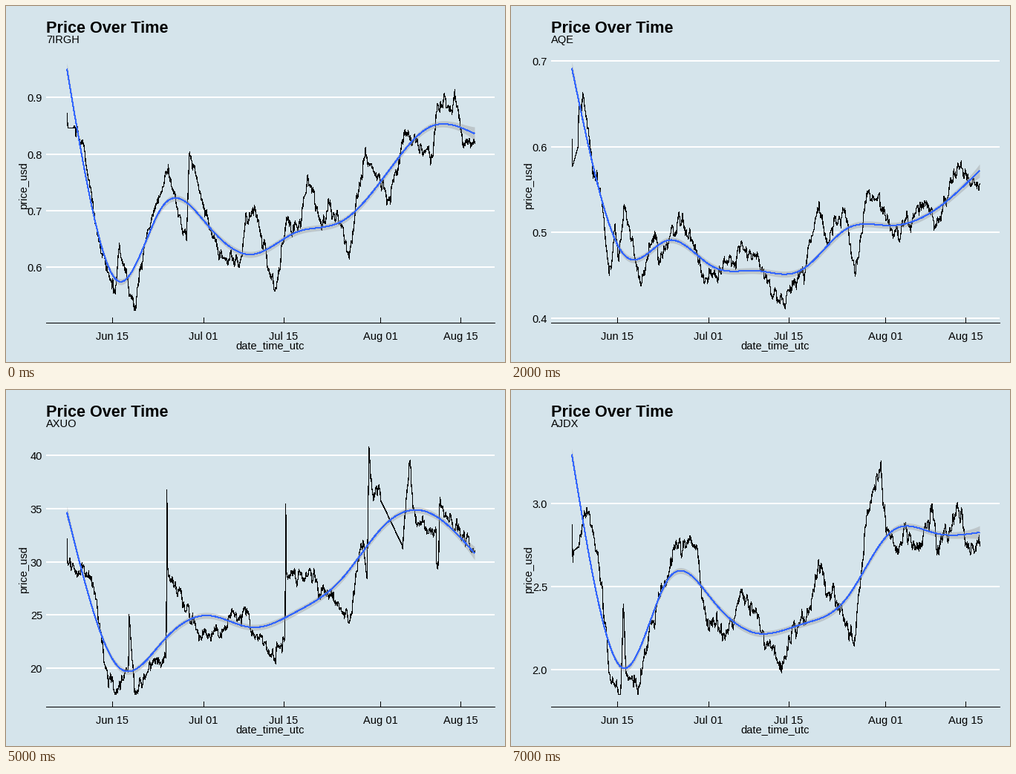
These frames come from a looping animation (672x480 px, 8000 ms). A matplotlib script:

```python
import numpy as np
import matplotlib.pyplot as plt
from matplotlib.animation import FuncAnimation

W, H, DPI = 672, 480, 96
BG = "#d5e4eb"
PX = 72 / DPI  # one pixel in points
X0, X1 = 82, 631

plt.rcParams["font.family"] = "Liberation Sans"
plt.rcParams["font.size"] = 11

fig = plt.figure(figsize=(W / DPI, H / DPI), dpi=DPI, facecolor=BG)
ax = fig.add_axes([0, 0, 1, 1])
ax.set_xlim(0, W)
ax.set_ylim(H, 0)
ax.axis("off")


def line(x, y, color, width, z):
    return ax.plot(x, y, color=color, lw=width * PX, zorder=z,
                   antialiased=False, solid_capstyle="butt",
                   solid_joinstyle="round")[0]


def label(x, y, s, **kw):
    kw = {"va": "baseline", "zorder": 6, **kw}
    return ax.text(x, y, s, **kw)


# Smoother knots: the first sample, then evenly spread over the dense data.
KNOTS = np.r_[X0, np.linspace(151, X1, 9)]


def spline(kx, ky):
    """Natural cubic spline through the knots."""
    kx, ky = np.array(kx, float), np.array(ky, float)
    n, h = len(kx), np.diff(kx)
    slope = np.diff(ky) / h
    a, b = np.eye(n), np.zeros(n)
    for k in range(1, n - 1):
        a[k, k - 1:k + 2] = h[k - 1], 2 * (h[k - 1] + h[k]), h[k]
        b[k] = 6 * (slope[k] - slope[k - 1])
    m = np.linalg.solve(a, b)
    x = np.linspace(X0, X1, 300)
    i = np.clip(np.searchsorted(kx, x) - 1, 0, n - 2)
    u, v, w = kx[i + 1] - x, x - kx[i], h[i]
    y = ((m[i] * u ** 3 + m[i + 1] * v ** 3) / (6 * w)
         + (ky[i] / w - m[i] * w / 6) * u
         + (ky[i + 1] / w - m[i + 1] * w / 6) * v)
    return x, y


def wander(keys, seed, size, calm=(82, 91)):
    """Correlated noise around straight runs between the turning points."""
    rng = np.random.default_rng(seed)
    kx, ky = np.array(keys, float).T
    x = np.union1d(np.arange(X0, X1, 0.5), kx)
    noise = np.zeros(len(x))
    for k in range(1, len(x)):
        noise[k] = 0.8 * noise[k - 1] + rng.normal(0, 0.6 * size)
    noise[(x > calm[0]) & (x < calm[1])] = 0
    noise[np.isin(x, kx)] *= 0.3
    return x, np.clip(np.interp(x, kx, ky) + noise, 76, 410)


def burst(rng, a, b, high, low, spread=12, rough=0):
    """Rapid flips between a high and a low level."""
    n = int((b - a) * 1.4)
    top = high + rough * rng.random(n)
    bottom = low - spread * rng.random(n)
    y = np.where(rng.random(n) < 0.5, top, bottom)
    return np.column_stack([np.linspace(a, b, n), y])


def flipping_price():
    rng = np.random.default_rng(5)
    return np.vstack([
        [(82, 299), (91, 339)],
        burst(rng, 92, 99, 285, 340), [(100, 349)],
        burst(rng, 101, 172, 285, 338), [(174, 359)],
        burst(rng, 175, 188, 285, 338),
        [(188.5, 335), (189.5, 104), (190.5, 215), (192.5, 98), (193.5, 240),
         (195.5, 76), (196, 330), (197, 275), (252, 399), (262, 390)],
        burst(rng, 276, 284, 390, 397, 3), [(300, 392), (378, 392),
                                            (378.5, 370), (384, 370)],
        burst(rng, 384.7, 389.3, 76, 150, 30),
        [(390, 339), (393, 274), (418, 333), (423.5, 224), (424.5, 335),
         (427.5, 224), (428.5, 335)],
        burst(rng, 429, 443, 272, 342, 15, 25),
        burst(rng, 444, 459, 283, 346, 15, 25),
        [(459.5, 224), (460.5, 345), (461, 285), (465, 283), (470, 248),
         (475, 226), (477, 248), (487, 318)],
        burst(rng, 488, 504, 319, 328, 5),
        burst(rng, 504, 559, 320, 338, 14),
        burst(rng, 560, 612, 319, 324, 4),
        burst(rng, 613, 631, 319, 336, 14),
    ]).T


def chart(top, bottom, names, price, trend, band=(4, 4.5, 5), shift=0.0):
    """Draw one full chart and return its artists."""
    out = []
    for y, s in zip(np.linspace(top, bottom, len(names)).round(), names):
        out.append(line([54, 658], [y, y], "white", 2, 1))
        out.append(label(49, y + 6, s, ha="right"))
    dates = zip((0, 16, 30, 47, 61),
                ("Jun 15", "Jul 01", "Jul 15", "Aug 01", "Aug 15"))
    for day, s in dates:
        x = round(143 + 7.69 * day - shift)
        out.append(line([x + 0.2] * 2, [420, 427], "black", 1, 2))
        out.append(label(x, 450, s, ha="center"))
    # whole-pixel steps and a hairline give a crisp one-pixel trace
    out.append(line(*(np.floor(v) + 0.5 for v in price), "black", 0.4, 3))
    x, y = trend
    base, left, right = band
    h = base + left * np.exp((X0 - x) / 9) + right * np.exp((x - X1) / 14)
    out.append(ax.fill_between(x, y - h, y + h, color="#999999", alpha=0.4,
                               lw=0, zorder=4, antialiased=False))
    out.append(line(x, y, "#3366ff", 1, 5))
    return out


# Turning points of each price, in pixels.
keys_a = [
    (82, 144), (83, 164), (91, 164), (104, 190), (124, 316), (147, 390),
    (152, 330), (173, 408), (186, 325), (218, 226), (243, 318), (247, 198),
    (258, 240), (288, 340), (318, 334), (323, 278), (336, 280), (362, 382),
    (375, 310), (395, 290), (405, 240), (424, 295), (446, 278), (462, 342),
    (482, 207), (517, 252), (537, 174), (574, 204), (579, 142), (605, 132),
    (614, 180), (631, 187),
]
keys_b = [
    (82, 179), (82.7, 216), (90, 190), (91, 140), (98, 125), (111, 222),
    (122, 260), (132, 368), (140, 295), (145, 345), (152, 268), (174, 376),
    (193, 303), (201, 346), (230, 287), (264, 370), (321, 327), (362, 404),
    (395, 355), (415, 265), (424, 316), (447, 277), (464, 356), (478, 264),
    (495, 257), (515, 308), (558, 264), (575, 293), (606, 207), (614, 242),
    (631, 240),
]
keys_d = [
    (82, 200), (83, 238), (108, 245), (122, 285), (132, 368), (147, 404),
    (164.5, 380), (165.5, 303), (174, 402), (215.5, 354), (216.5, 132),
    (217.5, 235), (240, 295), (265, 333), (320, 298), (362, 362),
    (375.5, 330), (376.5, 154), (377.5, 245), (415, 252), (463, 314),
    (478, 207), (486, 253), (488.5, 76), (491, 125), (504, 148), (534, 211),
    (543, 93), (548, 165), (579, 192), (579.5, 232), (582.5, 232),
    (583.5, 160), (631, 215),
]
keys_e = [
    (82, 181), (83, 232), (84, 217), (91, 211), (102, 160), (117, 220),
    (132, 380), (147, 405), (151, 292), (155, 385), (172, 396), (190, 310),
    (222, 202), (250, 212), (264, 320), (285, 336), (318, 277), (363, 378),
    (378, 322), (404, 300), (414, 227), (422, 268), (438, 280), (462, 346),
    (476, 192), (498, 95), (501, 160), (520, 226), (532, 195), (548, 215),
    (568, 160), (573, 213), (607, 165), (612, 205), (631, 210),
]
knots_c = [
    (82, 314), (130, 305), (175, 304), (245, 346), (312, 404), (365, 363),
    (410, 308), (440, 299), (500, 324), (530, 329), (580, 321), (631, 324),
]

charts = [
    chart(123.4, 352, ("0.9", "0.8", "0.7", "0.6"), wander(keys_a, 1, 7),
          spline(KNOTS, (85, 371, 270, 295, 335, 305, 291, 228, 163, 172))),
    chart(74, 421, ("0.7", "0.6", "0.5", "0.4"), wander(keys_b, 2, 7),
          spline(KNOTS, (84, 334, 316, 351, 357, 356, 301, 296, 275, 222))),
    chart(84.2, 402.2, [f"0.00{n}" for n in range(9, 3, -1)],
          flipping_price(), spline(*zip(*knots_c)), (6.5, 8, 5.5), 0.3),
    chart(88.4, 375, ("40", "35", "30", "25", "20"),
          wander(keys_d, 3, 7, (504, 534)),
          spline(KNOTS, (165, 373, 339, 304, 320, 299, 256, 181, 166, 220))),
    chart(153, 377, ("3.0", "2.5", "2.0"), wander(keys_e, 4, 8),
          spline(KNOTS, (87, 375, 256, 283, 328, 316, 282, 192, 193, 192))),
]

line([54, 658], [426.7, 426.7], "black", 1, 2)
label(54, 36, "Price Over Time", fontsize=16.25, weight="bold")
label(356, 462, "date_time_utc", ha="center")
label(31, 242.5, "price_usd", rotation=90, ha="right", va="center")
ticker = label(54, 50, "")
TICKERS = ("7IRGH", "AQE", "AXUO", "AJDX")


def draw(i):
    # the chart switches one second before its ticker does
    for k, group in enumerate(charts):
        for artist in group:
            artist.set_visible(k == (i + 1) // 2)
    ticker.set_text(TICKERS[i // 2])
    return []


anim = FuncAnimation(fig, draw, frames=8, interval=1000, repeat=True,
                     repeat_delay=0, init_func=lambda: draw(0))
plt.show()
```
